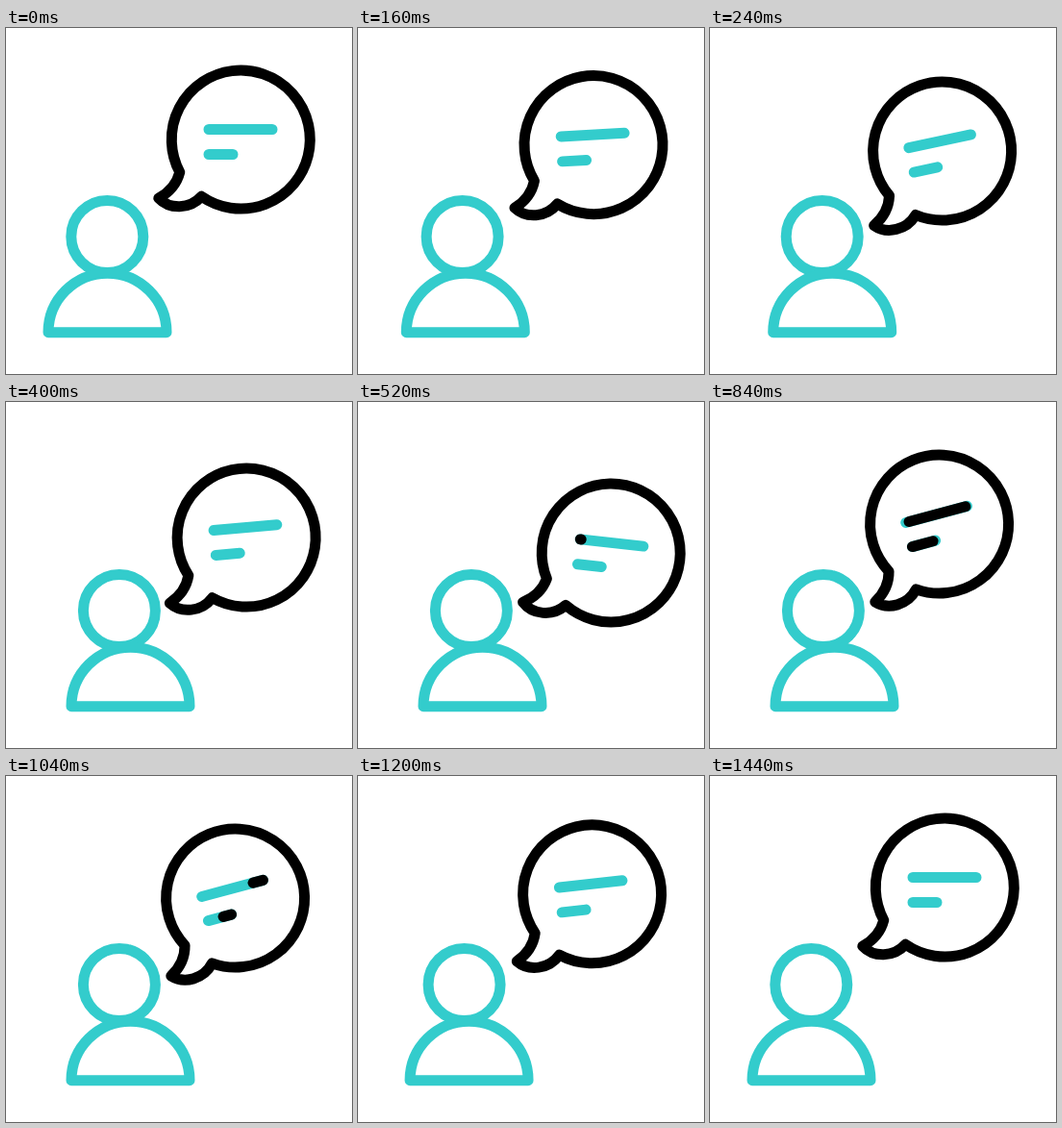
An HTML page that plays this animation: 360x360 px, repeating every 1.48 s.

```html
<!DOCTYPE html>
<html lang="en">
<head>
<meta charset="utf-8">
<title>Person speaking</title>
<style>
  html, body { margin: 0; width: 100%; height: 100%; overflow: hidden; background: #fff; }
  svg { display: block; width: 100%; height: 100%; }
  g { fill: none; stroke-width: 11; stroke-linecap: round; stroke-linejoin: round; }
  .teal { stroke: #33cccc; }
  .ink { stroke: #000; }
</style>
</head>
<body>
<svg viewBox="0 0 360 360">
  <g class="teal">
    <circle id="head" cx="105.3" cy="217" r="37.5"/>
    <path id="body" d="M44 316.7 A61.5 61.5 0 0 1 167 316.7 Z"/>
  </g>
  <g id="bubble" class="ink">
    <path d="M203.4 175.3 A72 72 0 1 0 180.8 150 C178 161 170 171 158.8 177 C170 189 191 189 203.4 175.3 Z"/>
    <path class="teal" d="M211 105.5 H277 M211 131.5 H236"/>
    <line id="sweep1" y1="105.5" y2="105.5"/>
    <line id="sweep2" y1="131.5" y2="131.5"/>
  </g>
</svg>
<script>
  const LOOP = 1480, STEP = 40;
  const CENTER = [244.2, 116];
  const $ = id => document.getElementById(id);

  // Eased progress of t from a to b, 0..1
  const ease = (t, a, b) => {
    const p = Math.min(1, Math.max(0, (t - a) / (b - a)));
    return (1 - Math.cos(Math.PI * p)) / 2;
  };

  const shift = (id, x) => $(id).setAttribute('transform', `translate(${x} 0)`);

  function drawBubble(t, back) {
    const lean = ease(t, 100, 299) - back;
    const swing = ease(t, 300, 510) - ease(t, 510, 640);
    // The leaning path is an arc, bowed more on the way out
    const bow = lean * (1 - lean);
    const [bx, by] = back > 0 ? [7, 9] : [11.6, 20];
    const x = -5.7 * lean + bx * bow + 25 * swing;
    const y = 11 * lean + by * bow + 30.4 * swing;
    const angle = -15 * lean + 21.6 * swing;
    $('bubble').setAttribute('transform',
      `translate(${x} ${y}) rotate(${angle} ${CENTER})`);
  }

  function drawSweep(id, length, from, to) {
    const line = $(id);
    line.setAttribute('x1', 211 + length * from);
    line.setAttribute('x2', 211 + length * to);
    line.style.display = to > from ? '' : 'none';
  }

  function draw(t) {
    const back = ease(t, 1040, 1330);
    const step = ease(t, 100, 275) - back;
    shift('head', 12.6 * step);
    shift('body', 24 * step);
    drawBubble(t, back);
    drawSweep('sweep1', 66, ease(t, 790, 1130), ease(t, 490, 880));
    drawSweep('sweep2', 25, ease(t, 873, 1153), ease(t, 610, 900));
  }

  const start = performance.now();
  function tick() {
    const t = (performance.now() - start) % LOOP;
    draw(Math.floor(t / STEP) * STEP);
    requestAnimationFrame(tick);
  }
  tick();
</script>
</body>
</html>
```
